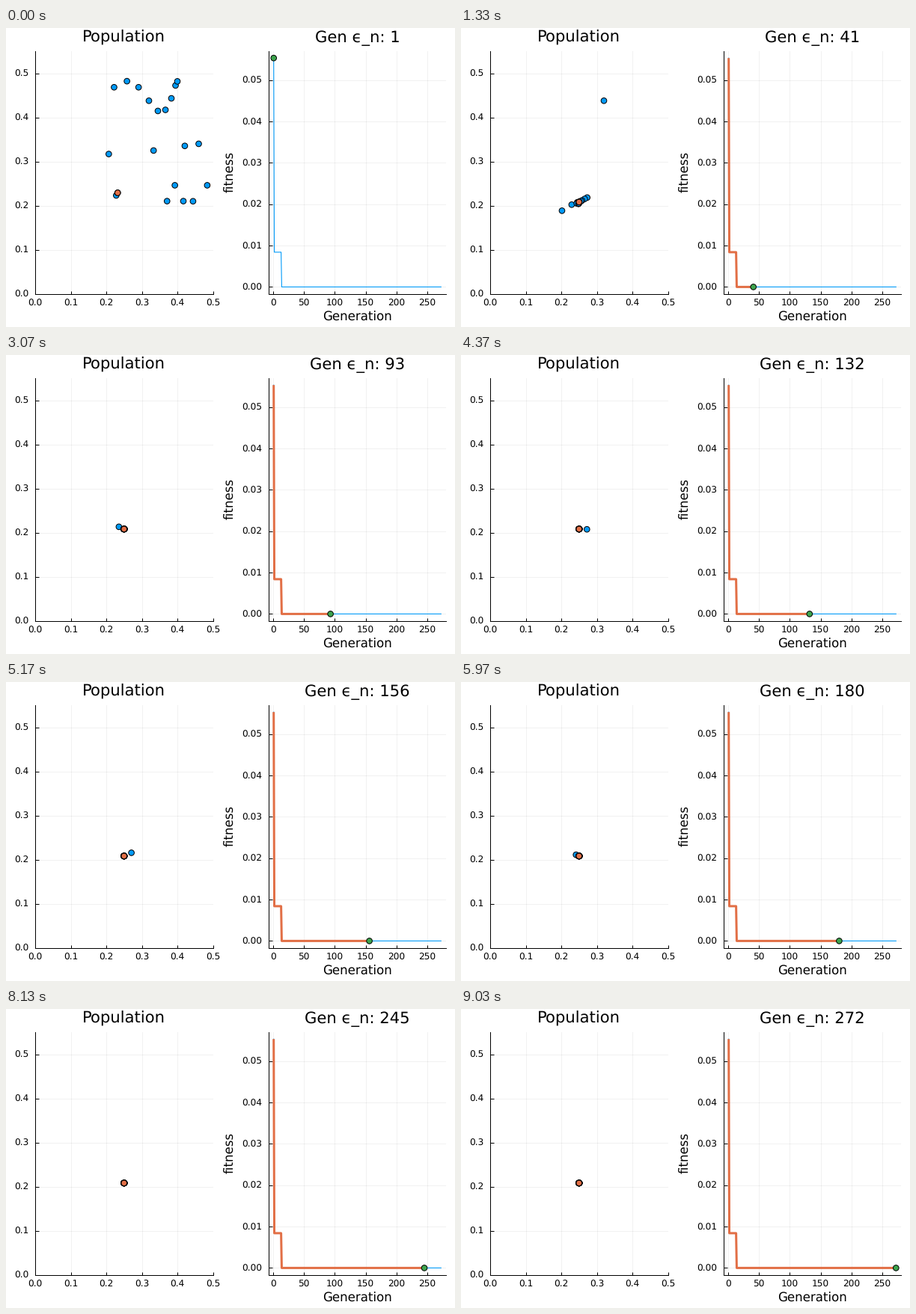
A matplotlib script for the animation above (9060 ms loop, 600 by 400 pixels).

```python
import numpy as np
import matplotlib.pyplot as plt
from matplotlib.animation import FuncAnimation

W, H, DPI = 600, 400, 100
GENS, STEP_MS, LOOP_MS = 272, 30, 9060
FRAMES = LOOP_MS // STEP_MS
BLUE, ORANGE, GREEN = "#009AF9", "#E26F46", "#3DA44D"
PX = 72 / DPI  # points per pixel

plt.rcParams.update({"font.family": "DejaVu Sans", "text.hinting": "none"})

BEST = np.array([0.25, 0.208])


def band(n, x0, x1, power, y, dy, freq, peak):
    """Loose row of points: eased along x, waving along y."""
    i = np.arange(n)
    x = x0 + (x1 - x0) * (1 - (1 - i / (n - 1)) ** power)
    return np.column_stack([x, y + dy * np.cos(freq * (i - peak))])


def first_population():
    return np.vstack([
        [(.228, .223)],
        band(9, .222, .400, 1.7, .447, .035, .92, 1),
        band(4, .207, .460, 1.7, .328, .012, .92, 3),
        band(5, .371, .484, .75, .222, .024, 2.09, 1),
        [(.232, .229)],
    ])


def stray(g):
    """The one individual that keeps jumping away until it settles."""
    k = g // 6
    reach = .034 / (1 + np.exp((g - 174) / 12))
    return BEST + reach * np.array([np.sin(1.963 * k + 1.53),
                                    .3 * np.cos(1.28 * (k - 6))])


def evolve():
    rng = np.random.default_rng(7)
    pop = first_population()
    out = [pop.copy()]
    for g in range(2, GENS + 1):
        spread = .12 * np.exp(-g / 12)
        for i in range(1, len(pop) - 1):
            if rng.random() < .15:
                along, across, drift = rng.normal(size=3)
                step = spread * np.array([along, .35 * along + .3 * across])
                step[0] += .0007 * drift
                pop[i] = BEST + np.clip(step, -.048, .2)
        if g > 25:
            pop[0] = stray(g)
        pop[-1] = BEST + (.006, .011) if g < 14 else BEST
        out.append(pop.copy())
    return np.array(out)


history = evolve()
gens = np.arange(1, GENS + 1)
fitness = np.where(gens == 1, .0553, np.where(gens < 14, .0084, 0))

fig = plt.figure(figsize=(W / DPI, H / DPI), dpi=DPI, facecolor="white")


def label(x, y, text, size, **kw):
    return fig.text(x / W, 1 - y / H, text, fontsize=size * PX, ha="center",
                    va="baseline", rotation_mode="anchor", **kw)


def panel(x0, x1, xlim, ylim, xticks, yticks, xfmt, yfmt):
    top, bottom = 31, 355.6
    ax = fig.add_axes([x0 / W, 1 - bottom / H, (x1 - x0) / W, (bottom - top) / H])
    ax.set(xlim=xlim, ylim=ylim)
    ax.set_xticks(xticks, [xfmt % v for v in xticks])
    ax.set_yticks(yticks, [yfmt % v for v in yticks])
    ax.spines[["top", "right"]].set_visible(False)
    for side in ("left", "bottom"):
        ax.spines[side].set_linewidth(1 * PX)
    ax.tick_params(direction="in", length=4.5 * PX, width=1 * PX, labelsize=12.1 * PX)
    ax.tick_params(axis="x", pad=7 * PX)
    ax.tick_params(axis="y", pad=8.5 * PX)
    ax.grid(color="black", alpha=.055, linewidth=1 * PX)
    ax.set_axisbelow(True)
    return ax


def dots(ax, color, z):
    # one size per point keeps the dots at subpixel positions
    return ax.scatter([0, 0], [0, 0], s=[(7.6 * PX) ** 2] * 2, color=color,
                      edgecolors="black", linewidths=1 * PX, clip_on=False,
                      zorder=z, snap=False)


tenths = np.arange(6) / 10
left = panel(39, 276.5, (0, .5), (0, .55), tenths, tenths, "%.1f", "%.1f")
pad_x, pad_y = .03 * (GENS - 1), .03 * fitness[0]
right = panel(351, 588, (1 - pad_x, GENS + pad_x), (-pad_y, fitness[0] + pad_y),
              np.arange(0, 251, 50), np.arange(6) / 100, "%d", "%.2f")

label(157.7, 19, "Population", 21.15)
title = label(469.5, 19, "", 21.15)
label(469.5, 392, "Generation", 16.67)
label(304.4, 192.2, "fitness", 16.67, rotation=90)

right.plot(gens, fitness, color=BLUE, linewidth=1.1 * PX, zorder=3)
trail, = right.plot([], [], color=ORANGE, linewidth=3 * PX, zorder=4,
                    solid_capstyle="butt")
crowd = dots(left, BLUE, 5)
leader = dots(left, ORANGE, 6)
cursor = dots(right, GREEN, 6)


def update(frame):
    k = int((frame + .5) * GENS / FRAMES)
    title.set_text(f"Gen ϵ_n: {k + 1}")
    crowd.set_offsets(history[k])
    leader.set_offsets(history[k, -1:])
    trail.set_data(gens[:k + 1], fitness[:k + 1])
    cursor.set_offsets([(gens[k], fitness[k])])
    return title, crowd, leader, trail, cursor


anim = FuncAnimation(fig, update, frames=FRAMES, interval=STEP_MS,
                     repeat=True, repeat_delay=0)
plt.show()
```
